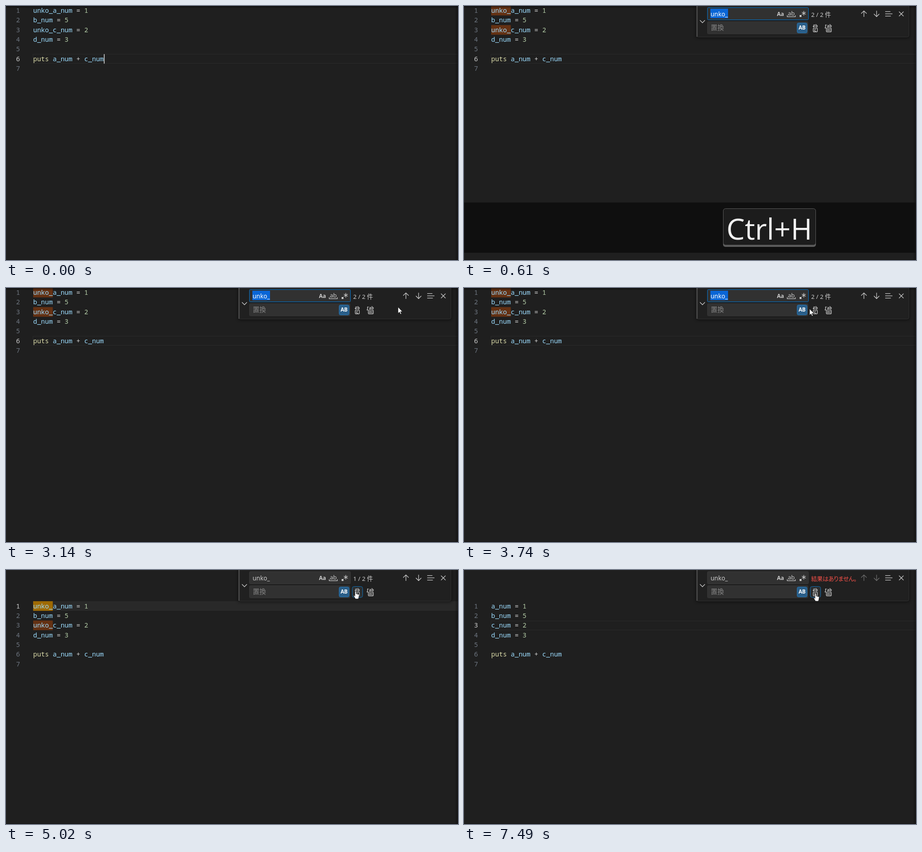
An HTML page for the animation above (8000 ms loop, 998 by 561 pixels).

```html
<!DOCTYPE html>
<html lang="ja">
<head>
<meta charset="utf-8">
<title>Find and replace</title>
<style>
html, body { margin: 0; width: 100%; height: 100%; overflow: hidden; background: #1f1f1f; }
svg { display: block; width: 998px; height: 561px; }
text { white-space: pre; }
.code { font: 14.44px "Noto Sans Mono", monospace; }
.ui { font-family: "Noto Sans", "Noto Sans CJK JP", sans-serif; fill: #ccc; }
.jp { font-family: "Noto Sans CJK JP", "Noto Sans", sans-serif; }
.line { fill: none; stroke: #ccc; stroke-width: 1.3; }
.bold { font-weight: 600; }
</style>
</head>
<body>
<svg viewBox="0 0 998 561">
  <defs>
    <linearGradient id="edge"><stop offset="0" stop-color="#000" stop-opacity="0"/><stop offset="1" stop-color="#000" stop-opacity=".4"/></linearGradient>
    <linearGradient id="shade" x2="0" y2="1"><stop offset="0" stop-color="#000" stop-opacity=".55"/><stop offset="1" stop-color="#000" stop-opacity="0"/></linearGradient>
    <filter id="blur" x="-10%" y="-30%" width="120%" height="160%"><feGaussianBlur stdDeviation="3"/></filter>
  </defs>
  <rect width="998" height="561" fill="#1f1f1f"/>
  <g id="editor" class="code"></g>
  <rect id="topShade" width="998" height="5" fill="url(#shade)"/>
  <rect x="991" width="7" height="561" fill="url(#edge)"/>
  <rect y="560" width="998" height="1" fill="#101010"/>

  <g id="widget" class="ui">
    <rect x="512" y="-8" width="472" height="79" rx="4" fill="#000" opacity=".45" filter="url(#blur)"/>
    <rect x="513.5" y="-8.5" width="469" height="77" rx="4" fill="#202020" stroke="#303030"/>
    <rect x="513" y="0" width="3" height="68" fill="#454545"/>
    <path class="line" d="M521 31.5l5.5 5.5 5.5-5.5"/>
    <rect id="input" x="537.5" y="3.5" width="223" height="27" rx="2" fill="#313131"/>
    <rect id="selection" x="544" y="6" width="39" height="21" fill="#0a66d6"/>
    <text id="query" x="544.5" y="23" font-size="13.5">unko_</text>
    <rect x="537.5" y="34.5" width="222" height="27" rx="2" fill="#313131" stroke="#363636"/>
    <text class="jp" x="545" y="53.4" font-size="14.5" fill="#858585">置換</text>

    <text class="bold" x="691" y="22" font-size="12">Aa</text>
    <text x="715" y="21.2" font-size="13">ab</text>
    <path class="line" d="M713.6 20.5v3.2h18v-3.2"/>
    <rect x="741" y="20" width="4.2" height="4.2"/>
    <path class="line" d="M750.3 11v10M746 13.5l8.6 5M746 18.5l8.6-5"/>

    <rect x="735.5" y="37.5" width="22" height="22" rx="3" fill="#2a5e88" stroke="#2477b8"/>
    <text class="bold" x="746.5" y="52.4" font-size="11.5" text-anchor="middle" style="fill:#fff">AB</text>

    <text id="count" x="766.5" y="23.8" font-size="13.3"></text>
    <text id="none" x="766.5" y="23.8" font-size="12.8" class="jp" style="fill:#f85149;font-feature-settings:'palt'">結果<tspan letter-spacing="-.5">はありません。</tspan></text>
    <g id="arrows" class="line">
      <path d="M883 24V11M877 16.8l6-6 6 6"/>
      <path d="M911 10.5v13M905 17.5l6 6 6-6"/>
    </g>
    <path class="line" d="M930 12.3h11.5M930 17.3h16M930 22.3h12.5"/>
    <path class="line" d="M960.5 12.5l10 10m0-10l-10 10"/>

    <rect id="button" x="764.5" y="36.5" width="23" height="24" rx="4"/>
    <g>
      <rect class="line" x="771.2" y="48.8" width="9" height="8.2" rx="1.2"/>
      <text class="bold" x="773" y="55.6" font-size="8.5">c</text>
      <text class="bold" x="775.8" y="47.2" font-size="8.5">b</text>
      <path class="line" stroke-width="1.1" d="M775 42h-2.6v4.3M770.2 44.4l2.2 2.2 2.2-2.2"/>
    </g>
    <g>
      <rect class="line" x="800" y="48.8" width="11" height="8.2" rx="1.2"/>
      <text class="bold" x="801.2" y="55.4" font-size="7.8">ac</text>
      <text class="bold" x="801.6" y="47.2" font-size="8.5">ab</text>
      <path class="line" d="M800.5 42h-2.2v7.4M796.5 47.6l1.8 1.8"/>
    </g>
  </g>

  <g id="keys">
    <rect y="434" width="998" height="111" fill="#0f0f0f"/>
    <rect x="572" y="448" width="205" height="84" rx="5" fill="#5c5c5c"/>
    <rect x="572.5" y="447.5" width="204" height="80.5" rx="5" fill="#1c1c1c" stroke="#5a5a5a"/>
    <text x="579.5" y="515.5" font-size="64" fill="#f2f2f2" style="font-family:'Open Sans','Noto Sans',sans-serif">Ctrl+H</text>
  </g>

  <g id="tip" class="ui">
    <rect x="778.5" y="58.5" width="60" height="18" fill="#2b2b2b" stroke="#4a4a4a"/>
    <text x="808.5" y="71.6" font-size="10.4" text-anchor="middle" style="fill:#f0f0f0">置換 (Enter)</text>
  </g>
  <circle id="click" r="11" fill="#c8c814" fill-opacity=".7" stroke="#d3141c" stroke-width="2.2"/>
  <g id="pointer" stroke-linejoin="round">
    <path id="beam" d="M-3-6h2.2l.8.8.8-.8H3M0-5.2V5.2M-3 6h2.2l.8-.8.8.8H3" fill="none" stroke="#d8d8d8" stroke-width="1.2"/>
    <path id="arrow" d="M0 0v14l3.2-3 2.2 5 2.2-1-2.2-4.8h4.4z" fill="#fff" stroke="#111" stroke-width=".8"/>
    <path id="hand" d="M-1.5 9V1.6a1.4 1.4 0 0 1 2.8 0V6l5 1.2q1.6.4 1.4 2.2l-.8 4.6-1 3.4h-6.2l-3.6-5.8q-1-1.6.4-2 1-.2 2 1.6z" fill="#fff" stroke="#111" stroke-width=".8"/>
  </g>
</svg>
<script>
const $ = id => document.getElementById(id);
const LOOP = 8000, ROW = 21.33, CHAR = 8.667, LEFT = 60;
const NS = 'http://www.w3.org/2000/svg';
const clamp = v => Math.max(0, Math.min(1, v));
const show = (id, on) => $(id).setAttribute('display', on ? 'inline' : 'none');
const set = (id, attrs) => {
  for (const k in attrs) $(id).setAttribute(k, attrs[k]);
};

// time, x, y of the pointer's hot spot
const path = [
  [1870, 897, 334], [2000, 866, 281], [2140, 858, 275], [2270, 720, 175],
  [2400, 674, 128], [2600, 700, 88], [2940, 868, 44], [3140, 866, 42],
  [3460, 738, 52], [3740, 763, 46], [4070, 763, 46], [4140, 769, 46],
  [4210, 772, 46.5], [5820, 772, 46.5], [5890, 776.5, 51.5]
];

function pointerAt(t) {
  const next = path.findIndex(p => p[0] > t);
  if (next < 0) return path[path.length - 1].slice(1);
  if (next === 0) return null;
  const [t0, x0, y0] = path[next - 1], [t1, x1, y1] = path[next];
  const k = (t - t0) / (t1 - t0);
  return [x0 + (x1 - x0) * k, y0 + (y1 - y0) * k];
}

function pointerKind(x, y) {
  const within = (a, b, c, d) => x >= a && x <= b && y >= c && y <= d;
  if (within(735, 758, 37, 60) || within(764, 788, 36, 61)) return 'hand';
  if (y > 69 || within(538, 760, 3, 62)) return 'beam';
  return 'arrow';
}

function colour(token) {
  if (token === 'puts') return '#dcdcaa';
  if (/^\d/.test(token)) return '#b5cea8';
  return /^\w/.test(token) ? '#9cdcfe' : '#d4d4d4';
}

const paint = line => line.replace(/\w+|\W+/g, s => `<tspan fill="${colour(s)}">${s}</tspan>`);
const box = (x, y, w, h, attrs) => `<rect x="${x}" y="${y}" width="${w}" height="${h}" ${attrs}/>`;

let drawn = '';
function drawEditor(s) {
  const key = JSON.stringify(s);
  if (key === drawn) return;
  drawn = key;
  const lines = [
    (s.stage > 1 ? '' : 'unko_') + 'a_num = 1', 'b_num = 5',
    (s.stage > 2 ? '' : 'unko_') + 'c_num = 2', 'd_num = 3',
    '', 'puts a_num + c_num', ''
  ];
  const top = s.stage ? 68.9 : -.5;
  const active = [5, 0, 2, 2][s.stage];
  const filled = s.stage === 1 || s.stage === 2;
  const rowY = Math.round(top + active * ROW) + .5;
  let out = box(LEFT - .5, rowY, 950, 20, `fill="${filled ? '#292929' : 'none'}" stroke="#2a2a2a"`);
  lines.forEach((line, i) => {
    const y = top + i * ROW;
    if (s.found && line.startsWith('unko_'))
      out += box(LEFT, y.toFixed(1), 5 * CHAR, 21.3, `fill="${filled && i === active ? '#9e6a03' : '#643113'}"`);
    const base = (y + 15.6).toFixed(1);
    out += `<text x="31" y="${base}" text-anchor="end" fill="${i === active ? '#d0d0d0' : '#6e7681'}">${i + 1}</text>`;
    out += `<text x="${LEFT}" y="${base}">${paint(line)}</text>`;
  });
  if (s.caret) out += box(216, 106.3, 1.6, 21, 'fill="#d4d4d4"');
  $('editor').innerHTML = out;
}

function render(t) {
  // 0 before the first click, then one step per click
  const stage = [5020, 6890, 7490].filter(at => t >= at).length;
  drawEditor({ stage, found: t >= 340, caret: t < 270 });
  show('topShade', stage === 0);

  const slide = clamp((t - 270) / 270);
  show('widget', t >= 270);
  set('widget', { transform: `translate(0 ${(-76 * (1 - slide) ** 2).toFixed(2)})` });
  const focus = t < 4950;
  set('input', { stroke: focus ? '#0078d4' : '#3a3a3a' });
  show('selection', focus);
  $('query').style.fill = focus ? '#fff' : '#ccc';
  $('count').textContent = ['2 / 2 件', '1 / 2 件', '1 / 1 件', ''][stage];
  show('none', stage === 3);
  set('arrows', { opacity: stage === 3 ? .45 : 1 });

  const click = [4950, 6820].some(at => t >= at && t < at + 70);
  show('button', t >= 4110);
  set('button', { fill: '#2c2e2f', stroke: stage && !click ? '#0f70b7' : 'none' });

  show('keys', t >= 270 && t < 1210);
  set('keys', { opacity: clamp((t - 200) / 200) });
  show('tip', t >= 4740 && t < 4950);

  const pos = pointerAt(t);
  show('pointer', pos);
  show('click', click);
  if (!pos) return;
  const [x, y] = pos, kind = pointerKind(x, y);
  set('pointer', { transform: `translate(${x.toFixed(1)} ${y.toFixed(1)})` });
  for (const k of ['beam', 'arrow', 'hand']) show(k, k === kind);
  set('click', { cx: x - 1, cy: y });
}

function tick() {
  render(performance.now() % LOOP);
  requestAnimationFrame(tick);
}
tick();
</script>
</body>
</html>
```
